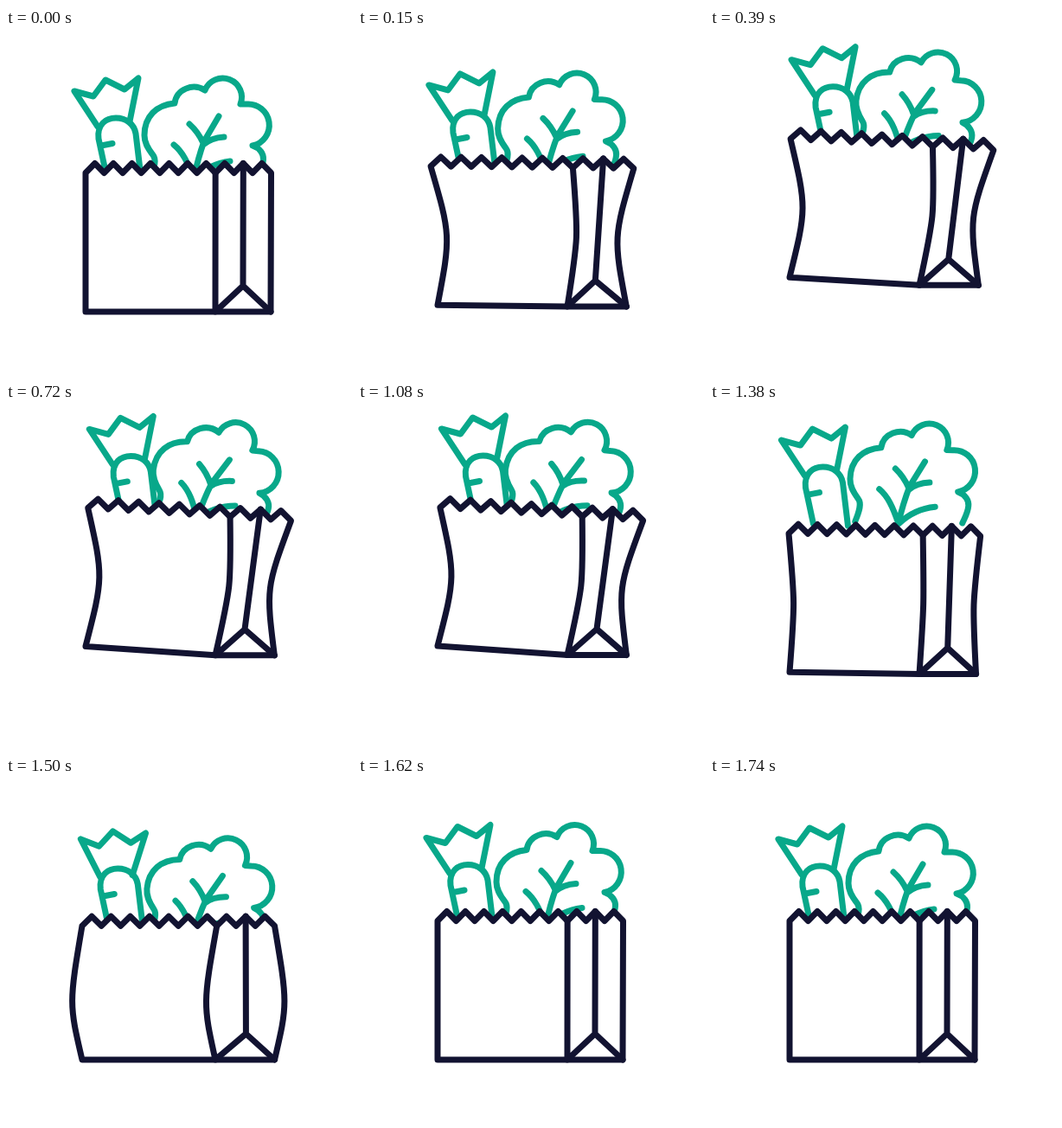
An HTML page that plays this animation: 400 by 400 pixels, repeating every 4770 ms.

```html
<!DOCTYPE html>
<html lang="en">
<head>
<meta charset="utf-8">
<title>Hopping grocery bag</title>
<style>
  html, body { margin: 0; width: 100%; height: 100%; overflow: hidden; background: #fff; }
  svg { display: block; width: 100%; height: 100%; }
  path { fill: none; stroke-width: 7; stroke-linecap: round; stroke-linejoin: round; }
  .green { stroke: #08a88a; }
  .navy { stroke: #121331; }
  #bag { fill: #fff; }
</style>
</head>
<body>
<svg viewBox="0 0 400 400">
  <g id="broccoli" class="green">
    <path d="M167 173C172 160 174 152 170 147C163 138 160 132 160 124C160 102 174 89 195 87
             C197 71 216 63 230 72A22 22 0 0 1 271 88L278 88A24.3 24.3 0 0 1 285 136
             C294 139 298 146 297.5 152C297 160 294 165 291 172"/>
    <path d="M246 102L229 131C225 142 221 155 217 174M212 111Q222 120 228 133M252 126Q237 127 228 135
             M194 135C204 143 210 155 217 174M259 154C243 156 228 164 218 174"/>
  </g>
  <g id="carrot" class="green">
    <path d="M116 170L107 128C105 111 116 104 127 104C139 104 148 111 150 122L156 172M110 136L123 133.5"/>
    <path id="leaves" d="M106 114L79 73L101 79L115 60L137 71L153 58L143 108"/>
  </g>
  <path id="bag" class="navy"/>
  <path id="folds" class="navy"/>
</svg>
<script>
const LOOP = 4770, STEP = 30, END = 1740;
const DROP = 1080, LAND = 1500;
const TEETH = 10, TOOTH = 11, FOLD_X = 242;

const ramp = (t, from, to) => Math.min(1, Math.max(0, (t - from) / (to - from)));
const smooth = (t, from, to) => {
  const u = ramp(t, from, to);
  return u * u * (3 - 2 * u);
};
const byId = id => document.getElementById(id);

// Shared drivers: the bag rises, leans and pinches in, then drops and squashes.
function poseAt(t) {
  const rise = 0.97 * smooth(t, 30, 490) + 0.03 * ramp(t, 0, DROP);
  return {
    rise,
    lift: rise * (1 - ramp(t, DROP, 1455) ** 2),
    lean: rise * (1 - smooth(t, DROP, LAND)),
    pinch: 14.5 * smooth(t, 0, 150) * (1 - smooth(t, 1200, LAND)),
    squash: 13.5 * smooth(t, 1410, 1530) * (1 - smooth(t, 1530, 1620))
  };
}

function drawBag({ lift, lean, pinch, squash }) {
  const flare = 0.7 * pinch + 0.35 * squash;
  const topY = 167.5 - 40 * lift + 0.5 * squash, bottomY = 328 - 40.5 * lift;
  const topLeft = [92 + 13 * lean - flare, topY - 5.5 * lean];
  const topRight = [306.5 + 13 * lean + flare, topY + 9.5 * lean];
  const bottomLeft = [92 - 0.35 * squash, bottomY - 5.5 * lean];
  const bottomRight = [306 + 0.3 * pinch + 0.4 * squash, bottomY + 5 * lean];
  const foldBottom = [FOLD_X, bottomRight[1]];
  const gusset = [274 + 2 * lift + 0.3 * squash, bottomRight[1] - 30];

  const bentLine = (from, to, bulge) => {
    const knee = [(from[0] + to[0]) / 2 + bulge * 4 / 3, (from[1] + to[1]) / 2 + 1.1 * squash];
    return `C${knee} ${knee} ${to}`;
  };
  const zigzag = Array.from({ length: 2 * TEETH + 1 }, (_, i) => {
    const u = i / (2 * TEETH);
    return [
      topLeft[0] + (topRight[0] - topLeft[0]) * u,
      topLeft[1] + (topRight[1] - topLeft[1]) * u - (i % 2) * TOOTH
    ];
  });
  const squeeze = pinch - squash;
  byId('bag').setAttribute('d', `M${zigzag.join('L')}${bentLine(topRight, bottomRight, -squeeze)}` +
    `L${foldBottom}L${bottomLeft}${bentLine(bottomLeft, topLeft, squeeze)}Z`);
  byId('folds').setAttribute('d',
    `M${zigzag[14]}${bentLine(zigzag[14], foldBottom, 0.5 * pinch - squash)}` +
    `L${gusset}L${bottomRight}M${gusset}L${zigzag[17]}`);
}

// Carried up by the bag, thrown past its top, then a damped bounce.
function tossY(t, rise, carry, peak, peakTime) {
  if (t < DROP) return -carry * rise;
  if (t < LAND) return -peak + (peak - carry) * ((t - peakTime) / (peakTime - DROP)) ** 2;
  return 3 * Math.cos(Math.PI * (t - LAND) / 120) * (1 - ramp(t, LAND, END));
}

function drawProduce(t, { rise, lean, squash }) {
  const carrotY = tossY(t, rise, 42, 48.6, 1190);
  const broccoliY = tossY(t, rise, 37.5, 50.6, 1220) + 0.8 * squash;
  byId('carrot').setAttribute('transform', `translate(${17.5 * lean + 0.2 * squash} ${carrotY})`);
  byId('leaves').setAttribute('transform', `rotate(${0.55 * squash} 110 118)`);
  byId('broccoli').setAttribute('transform',
    `translate(${11 * lean + 0.3 * squash} ${broccoliY}) rotate(${7 * lean + 0.4 * squash} 230 115)`);
}

const begin = performance.now();
function frame() {
  const elapsed = (performance.now() - begin) % LOOP;
  const time = Math.min(END, Math.floor(elapsed / STEP) * STEP);
  const pose = poseAt(time);
  drawBag(pose);
  drawProduce(time, pose);
  requestAnimationFrame(frame);
}
frame();
</script>
</body>
</html>
```
